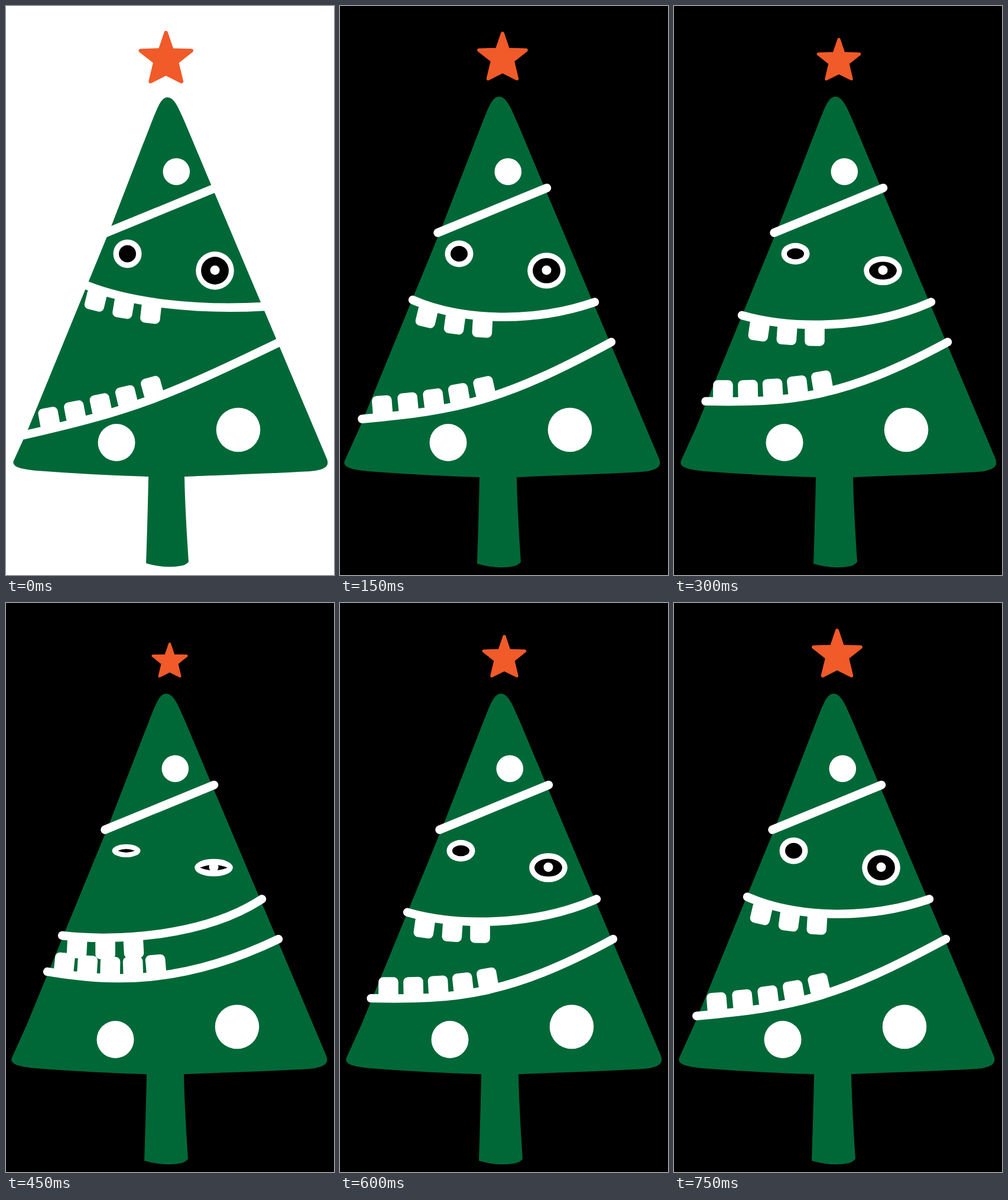
An HTML page for the animation above (0.9 s loop, 555 by 960 pixels).

```html
<!DOCTYPE html>
<html lang="en">
<head>
<meta charset="utf-8">
<title>Tree monster</title>
<style>
  html, body { margin: 0; width: 100%; height: 100%; overflow: hidden; background: #fff; }
  svg { display: block; width: 100%; height: 100%; }
  .band { fill: none; stroke: #fff; stroke-width: 14.4; stroke-linecap: round; }
  .white { fill: #fff; }
  #star { fill: #f15a29; stroke: #f15a29; stroke-width: 6; stroke-linejoin: round; }
</style>
</head>
<body>
<svg viewBox="0 0 555 960">
  <rect id="back" width="555" height="960"/>
  <g id="tree">
    <path id="body" fill="#006837" d="M12 767 L37 712 L176 374 L230 235 C253 178 259 153 273 153
      C286 153 293 172 305 199 L350 306 L544 764 C549 777 540 784 515 786
      C450 790 370 792 303 795 Q304 850 310 938 Q306 943 299 945 Q270 951 236 941
      Q239 850 240 795 C170 793 105 789 52 785 C20 782 8 777 12 767Z"/>
    <g class="white">
      <circle cx="288.3" cy="279.5" r="22.8"/>
      <circle cx="187" cy="736.5" r="31.5"/>
      <circle cx="393" cy="715" r="37.3"/>
    </g>
    <path class="band" d="M169.5 382.5 L354 307"/>
    <path class="band" id="upper"/>
    <path class="band" id="lower"/>
    <g id="teeth" class="white"></g>
    <ellipse class="white" id="eyeL"/><path id="pupilL"/>
    <ellipse class="white" id="eyeR"/><path id="pupilR"/>
    <circle class="white" cx="353.5" cy="445.7" r="8"/>
    <path id="star" d="M0-82 L9.5-54 L41-53 L17.5-34.5 L25-3.5 L0-16 L-25-3.5 L-17.5-34.5 L-41-53 L-9.5-54Z"/>
  </g>
</svg>
<script>
const STEP = 150;
const SHIFT = [0, -4, 0, -2, -1, -3];   // sideways jitter of the whole tree
const UPPER = 3, LOWER = 5, TOOTH = 36;

const $ = id => document.getElementById(id);
const set = (el, attrs) => {
  for (const key in attrs) el.setAttribute(key, attrs[key]);
};
const lerp = (a, b, k) => a + (b - a) * k;
const mix = (p, q, k, sag = 0) => [lerp(p[0], q[0], k), lerp(p[1], q[1], k) + sag];

const teeth = Array.from({ length: UPPER + LOWER }, (_, i) => {
  const tooth = document.createElementNS('http://www.w3.org/2000/svg', 'rect');
  set(tooth, { x: -16.8, y: i < UPPER ? 0 : -TOOTH, width: 33.6, height: TOOTH, rx: 8 });
  return $('teeth').appendChild(tooth);
});

// Point and slope angle of a cubic curve, found by its x.
function curveAt([p, q, r, s], x) {
  const value = (t, k) => {
    const m = 1 - t;
    return m * m * m * p[k] + 3 * m * m * t * q[k] + 3 * m * t * t * r[k] + t * t * t * s[k];
  };
  let lo = 0, hi = 1;
  for (let i = 0; i < 20; i++) {
    const mid = (lo + hi) / 2;
    if (value(mid, 0) < x) lo = mid; else hi = mid;
  }
  const d = 0.01;
  const rise = value(lo + d, 1) - value(lo - d, 1);
  const run = value(lo + d, 0) - value(lo - d, 0);
  return { y: value(lo, 1), angle: Math.atan2(rise, run) * 180 / Math.PI };
}

// Spread a row of teeth along a band; each leans partly with its slope.
function drawRow(row, curve, from, to) {
  row.forEach((tooth, i) => {
    const x = lerp(from, to, i / (row.length - 1));
    const { y, angle } = curveAt(curve, x);
    set(tooth, { transform: `translate(${x} ${y}) rotate(${angle * 0.75})` });
  });
}

function drawBand(id, [p, q, r, s]) {
  set($(id), { d: `M${p} C${q} ${r} ${s}` });
}

function drawMouth(u, wide) {
  const close = 0.8 * u + 0.2 * u ** 5;
  const slide = u ** 3;
  const sagTop = 70 * u * (1 - u) ** 2;
  const sagLow = 50 * u * (1 - u);

  const upper = [
    mix([138, 472], [97, 561], close),
    mix([210, 500], [190, 572], close, sagTop),
    mix([320, 514], [340, 562], close, sagTop),
    [435 + 3 * wide, 499.5 + 7.5 * wide]
  ];
  const lower = [
    mix([30, 724], [72, 622], close),
    mix([215, 682], [180, 640], close, sagLow),
    mix([270, 660], [300, 645], close, sagLow),
    [463, 567]
  ];
  drawBand('upper', upper);
  drawBand('lower', lower);
  drawRow(teeth.slice(0, UPPER), upper, lerp(156, 123, slide), lerp(247, 217, slide));
  drawRow(teeth.slice(UPPER), lower, lerp(76, 99, slide), lerp(252, 257, slide));
}

const oval = (x, y, rx, ry) =>
  `M${x - rx} ${y} a${rx} ${ry} 0 1 1 ${2 * rx} 0 a${rx} ${ry} 0 1 1 ${-2 * rx} 0Z`;
const lens = (x, y, rx, ry) =>
  `M${x - rx} ${y} q${rx} ${-2 * ry} ${2 * rx} 0 q${-rx} ${2 * ry} ${-2 * rx} 0Z`;

function drawEye(side, x, y, r, pupil, u) {
  const lid = u * u;
  const shape = u === 1 ? lens : oval;
  set($('eye' + side), { cx: x, cy: y, rx: r, ry: r * (1 - 0.54 * lid) });
  set($('pupil' + side), { d: shape(x, y, pupil, pupil * (1 - 0.8 * lid)) });
}

function draw(time) {
  const step = Math.floor(time / STEP) % 6;
  const u = 1 - Math.abs(step - 3) / 3;   // 0 mouth open, 1 shut
  const wide = step === 0 ? 1 : 0;

  set($('back'), { fill: wide ? '#fff' : '#000' });
  set($('body'), { stroke: wide ? '#fff' : 'none', 'stroke-width': 2 });
  set($('tree'), { transform: `translate(${SHIFT[step]} 0)` });

  drawMouth(u, wide);
  drawEye('L', 205.5, 418, 24, 14.5, u);
  drawEye('R', 353.5, 446.5, 32.3, 23.4, u);

  const size = 1.05 - 0.355 * u ** 1.4;
  set($('star'), { transform: `translate(${279 - 8.3 * wide} ${126 + 5 * wide}) scale(${size})` });
}

let start;
function tick(now) {
  start ??= now;
  draw(now - start);
  requestAnimationFrame(tick);
}
draw(0);
requestAnimationFrame(tick);
</script>
</body>
</html>
```
